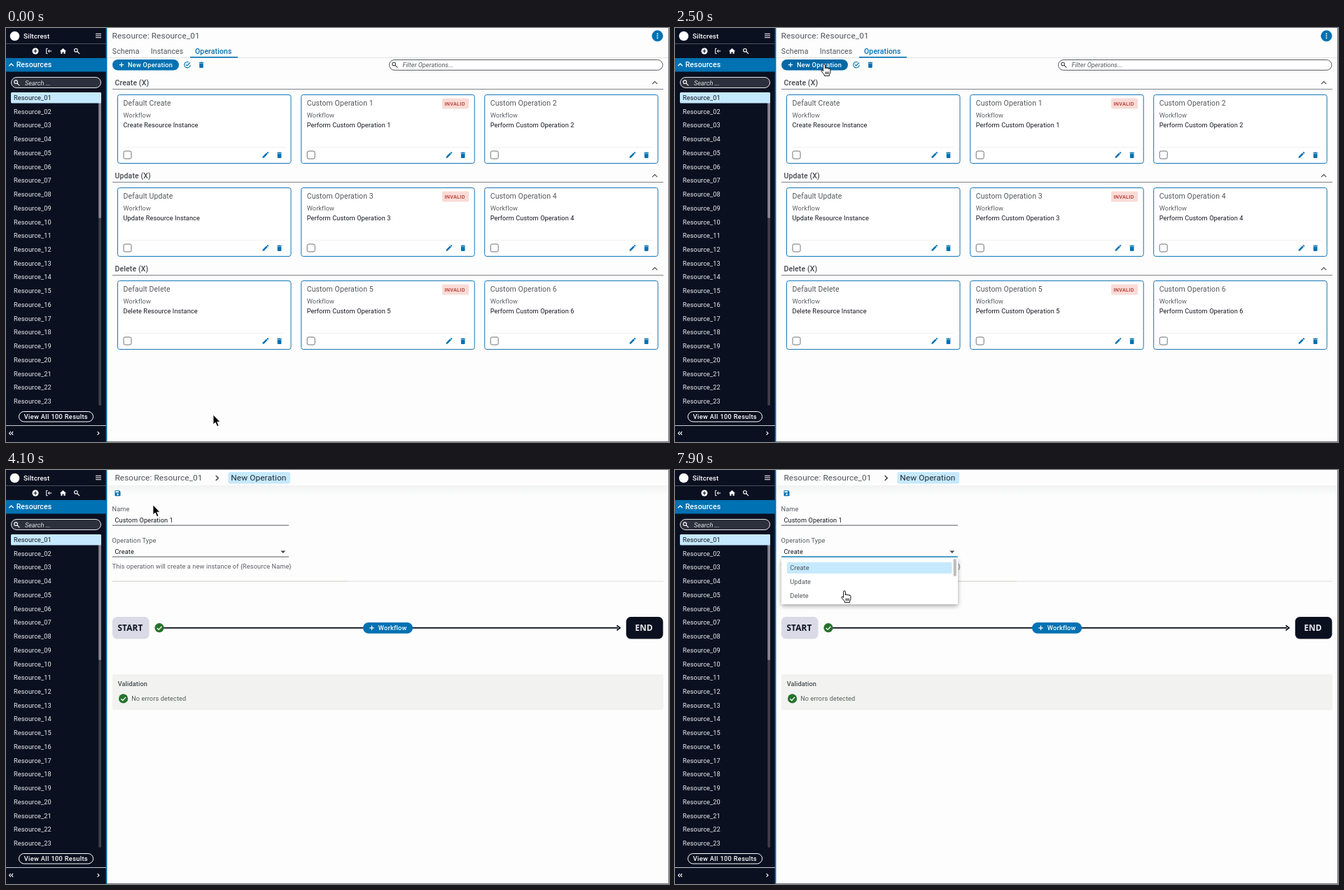
Write an HTML page that moves like this. It is 947 px wide and 592 px high and loops after 8 s.

```html
<!DOCTYPE html>
<html lang="en">
<head>
<meta charset="utf-8">
<title>Resource operations</title>
<style>
html, body { margin: 0; width: 100%; height: 100%; overflow: hidden; background: #fdfdfd; }
svg { display: block; width: 947px; height: 592px; }
text { font-family: Roboto, Arial, sans-serif; letter-spacing: .1px; white-space: pre; }
.sm { font-size: 9.2px; }
.md { font-size: 10.52px; }
.lg { font-size: 11.84px; }
.mid { font-weight: 500; }
.btn { font-size: 9.2px; font-weight: 500; letter-spacing: .26px; }
.it { font-size: 9.2px; font-style: italic; letter-spacing: 0; }
.tag { font-size: 7.23px; font-weight: 500; letter-spacing: .3px; }
.node { font: 700 11.84px "Open Sans", "Noto Sans", sans-serif; letter-spacing: .1px; }
</style>
</head>
<body>
<svg id="stage" viewBox="0 0 947 592" xmlns="http://www.w3.org/2000/svg"></svg>
<script>
const BLUE = '#0071b2', NAVY = '#0b1020', PALE = '#c5e9fe', GREEN = '#26722d';

// Markup helpers
const text = (x, y, str, cls, fill) => `<text x="${x}" y="${y}" class="${cls}" fill="${fill}">${str}</text>`;
const box = (x, y, w, h, fill, r = 0, extra = '') =>
  `<rect x="${x}" y="${y}" width="${w}" height="${h}" rx="${r}" fill="${fill}" ${extra}/>`;
const outline = (x, y, w, h, color, r, fill = 'none') => box(x, y, w, h, fill, r, `stroke="${color}"`);
const disc = (x, y, r, fill) => `<circle cx="${x}" cy="${y}" r="${r}" fill="${fill}"/>`;
const shape = (x, y, d, fill) => `<path transform="translate(${x} ${y})" d="${d}" fill="${fill}" fill-rule="evenodd"/>`;
const stroke = (x, y, d, color, w = 1.2) =>
  `<path transform="translate(${x} ${y})" d="${d}" fill="none" stroke="${color}" stroke-width="${w}"/>`;
const group = (id, body) => `<g id="${id}">${body}</g>`;

// Icons, centred on x, y
const lens = (x, y, color, w = 1.1) => stroke(x, y, 'M.9-1.2A2.3 2.3 0 1 1-3.7-1.2A2.3 2.3 0 1 1 .9-1.2M.4.5L3.8 3.9', color, w);
const plus = (x, y, color, s = 3.2) => stroke(x, y, `M${-s} 0H${s}M0 ${-s}V${s}`, color);
const trash = (x, y) => shape(x, y, 'M-3.2-3.8H-1.4L-.9-4.3H.9L1.4-3.8H3.2V-2.8H-3.2ZM-2.8-2.3H2.8V3.3Q2.8 4.2 1.9 4.2H-1.9Q-2.8 4.2-2.8 3.3Z', BLUE);
const pencil = (x, y) => shape(x, y, 'M-4 4V2.2L1.4-3.2L3.2-1.4L-2.2 4ZM1.9-3.7L2.8-4.5Q3.2-4.8 3.6-4.4L4.4-3.6Q4.8-3.2 4.5-2.8L3.7-1.9Z', BLUE);
const check = (x, y, r) => disc(x, y, r, GREEN) +
  stroke(x, y, `M${-r * .5} ${r * .05}L${-r * .12} ${r * .4}L${r * .52} ${-r * .3}`, '#fff', 1.3);

function sidebar() {
  let s = box(0, 0, 143, 592, NAVY) + box(142.6, 0, 1.8, 592, BLUE);
  s += disc(12.5, 11.5, 6.8, '#fff') + text(25, 14.7, 'Siltcrest', 'mid" font-size="9.86', '#fff');
  s += stroke(132, 11, 'M-4-2.7H4M-4 0H4M-4 2.7H4', '#fff', 1);
  s += box(0, 22, 143, 1, '#4a4f5b');
  s += disc(42, 33, 4.5, '#fff') + plus(42, 33, NAVY, 2.4);
  s += stroke(61, 33, 'M-1.4-3.6H-3.3V3.6H-1.4M4.2 0H-.8M1.2-2L-.8 0L1.2 2', '#fff', 1);
  s += shape(81.5, 33, 'M0-4L4.6.2H3.2V3.8H1V1.2H-1V3.8H-3.2V.2H-4.6Z', '#fff');
  s += lens(101.3, 33, '#fff');
  s += box(0, 43, 143, 19.5, BLUE) + stroke(7.5, 52.5, 'M-3.2 1.7L0-1.5L3.2 1.7', '#fff', 1.3);
  s += text(14.7, 56.2, 'Resources', 'md mid', '#fff');
  s += outline(7.5, 70.5, 128, 15, '#e8e8ea', 7.5, '#2b303c') + lens(15.5, 78.4, '#fff');
  s += text(27, 81.6, 'Search ...', 'it', '#dcdde0');
  s += box(132.3, 92, 3.7, 448, '#3c4049', 1.8) + box(132.3, 92, 3.7, 180, '#858891', 1.8);
  s += box(7, 92, 129, 15.5, PALE, 1.5);
  for (let i = 0; i < 23; i++) {
    const label = 'Resource_' + String(i + 1).padStart(2, '0');
    s += text(11, (103 + i * 19.73).toFixed(2), label, 'sm', i ? '#eceef2' : '#10151f');
  }
  s += outline(18.5, 548.5, 106, 14.5, '#fff', 7.25);
  s += text(25.7, 559, 'View All 100 Results', 'btn" style="letter-spacing:.36px', '#fff');
  s += box(0, 568, 143, 1, '#c9cbd0');
  s += stroke(7.2, 579.5, 'M-.3-2.4L-2.6 0L-.3 2.4M2.9-2.4L.6 0L2.9 2.4', '#fff', 1.1);
  s += stroke(131.8, 579.5, 'M-1.2-2.4L1.2 0L-1.2 2.4', '#fff', 1.1);
  return s;
}

function card(x, y, title, desc, invalid) {
  let s = outline(x, y, 247.5, 98, '#1476b5', 3, '#fff');
  s += text(x + 8, y + 15.8, title, 'md', '#55575c');
  s += text(x + 8, y + 32.8, 'Workflow', 'sm', '#5e6066');
  s += text(x + 8, y + 46, desc, 'sm', '#14161f');
  if (invalid) s += box(x + 201.2, y + 5, 38.3, 15, '#fadbd6', 2) + text(x + 204.8, y + 15.2, 'INVALID', 'tag', '#b3312a');
  s += box(x + 8, y + 74.5, 231.5, 1, '#f0f0f0');
  s += outline(x + 8.5, y + 80.5, 11, 11, '#6f7176', 2.2);
  return s + pencil(x + 211, y + 86.2) + trash(x + 231, y + 86.2);
}

function listPage() {
  let s = text(151.6, 15.2, 'Resource: Resource_01', 'lg', '#50535a');
  s += disc(930.5, 11.3, 8, BLUE) + [-3, 0, 3].map(d => disc(930.5, 11.3 + d, 1, '#fff')).join('');
  s += text(151.8, 36.5, 'Schema', 'md', '#50535a') + text(206.8, 36.5, 'Instances', 'md', '#50535a');
  s += text(270, 36.5, 'Operations', 'md mid', BLUE);
  s += box(145, 42, 801, 1, '#e3e3e3') + box(263, 41, 68, 1.6, BLUE);
  s += box(152, 45, 95, 15.6, BLUE, 7.8, 'id="newBtn"') + plus(165, 52.7, '#fff') + text(174, 56.1, 'New Operation', 'btn', '#fff');
  s += stroke(259, 52.7, 'M4.2 0A4.2 4.2 0 1 1 1.8-3.8M-2-.4L-.4 1.3L4-3.2', BLUE, 1.1) + trash(279, 52.7);
  s += outline(547.5, 45.5, 390.5, 14.8, '#55585e', 7.4, '#fff') + lens(555.5, 52.8, '#44474d');
  s += text(566.5, 56, 'Filter Operations...', 'it', '#55585e');
  ['Create', 'Update', 'Delete'].forEach((kind, row) => {
    const y = row * 133, odd = row * 2 + 1;
    s += text(155.6, 82 + y, kind + ' (X)', 'md mid', '#45484e');
    s += stroke(926.7, 78.3 + y, 'M-3.6 1.8L0-1.8L3.6 1.8', '#45484e', 1.1);
    s += box(152, 87 + y, 787, 1, '#808287');
    s += card(159.5, 95.5 + y, 'Default ' + kind, kind + ' Resource Instance');
    for (const n of [odd, odd + 1])
      s += card(n === odd ? 421.7 : 683.7, 95.5 + y, 'Custom Operation ' + n, 'Perform Custom Operation ' + n, n === odd);
  });
  return s;
}

function formPage() {
  let s = text(155.4, 15.2, 'Resource: Resource_01', 'lg', '#50535a');
  s += stroke(301.5, 11.5, 'M-1.8-3.6L1.8 0L-1.8 3.6', '#35383e', 1.4);
  s += box(317.5, 3, 88.5, 16.5, PALE, 3) + text(321.3, 15.2, 'New Operation', 'lg', '#1d2733');
  s += box(145, 22, 801, 14, 'url(#fade)');
  s += shape(159.5, 33.3, 'M-3.3-4H2.2L4-2.2V3.3Q4 4 3.3 4H-3.3Q-4 4-4 3.3V-3.3Q-4-4-3.3-4ZM-3-3V-1H1.6V-3ZM-1.4 1.5A1.4 1.4 0 1 0 1.4 1.5A1.4 1.4 0 1 0-1.4 1.5Z', BLUE);
  s += text(151.6, 59.3, 'Name', 'sm', '#55585e') + text(155.5, 75.1, 'Custom Operation 1', 'sm', '#14161f');
  s += box(152, 78.6, 252, 1, '#55585e', 0, 'id="nameLine"');
  s += text(151.6, 104.2, 'Operation Type', 'sm', '#55585e') + text(155.5, 119.9, 'Create', 'sm', '#14161f');
  s += shape(395.8, 117.2, 'M-3.5-1.7H3.5L0 1.8Z', '#45484e');
  s += box(152, 123.6, 252, 1, '#55585e', 0, 'id="typeLine"');
  s += text(151.6, 140.9, 'This operation will create a new instance of {Resource Name}', 'sm', '#5e6066');
  s += box(152, 158.6, 336, 1, '#cbccc2') + box(488, 158.6, 451, 1, '#dfdfdd');
  s += box(219, 224.8, 655, 1.9, NAVY) + stroke(877, 225.7, 'M-4.5-3.5L0 0L-4.5 3.5', NAVY, 1.8);
  s += box(152, 210, 52.5, 31.5, '#dadae6', 6.5) + text(159.5, 230.2, 'START', 'node', NAVY);
  s += box(885.8, 210, 52.7, 31.5, NAVY, 6.5) + text(898.6, 230.2, 'END', 'node', '#e9e9f2');
  s += check(219, 225.7, 6.6);
  s += box(510, 218, 71, 15.8, BLUE, 7.9) + plus(522.5, 225.8, '#fff') + text(531.7, 229.1, 'Workflow', 'btn', '#fff');
  s += box(152, 292, 787, 51, '#f2f3f0', 3) + text(159.7, 308.8, 'Validation', 'sm mid', '#45484e');
  s += check(167.6, 326.9, 6.6) + text(179.2, 330.2, 'No errors detected', 'sm', '#5a5d62');
  return s;
}

function menu() {
  let s = box(152, 126, 252, 66, '#fff', 2.5, 'filter="url(#soft)"');
  s += box(160, 132, 235.5, 16, PALE, 1.5) + box(397.6, 127, 4.4, 25, '#bfbfc1', 2.2);
  ['Create', 'Update', 'Delete'].forEach((kind, i) => s += text(164.3, 143.2 + i * 19.73, kind, 'sm', '#50535a'));
  return s;
}

const $ = id => document.getElementById(id);
$('stage').innerHTML = `<defs>
  <linearGradient id="fade" x2="0" y2="1"><stop stop-color="#f1f2f3"/><stop offset="1" stop-color="#fdfdfd"/></linearGradient>
  <filter id="soft" x="-10%" y="-20%" width="120%" height="150%"><feDropShadow dx="0" dy="2.5" stdDeviation="3" flood-opacity=".35"/></filter>
  </defs>` + box(0, 0, 947, 592, '#fdfdfd') + group('list', listPage()) + group('form', formPage()) +
  group('menu', menu()) + sidebar() + box(946, 0, 1, 592, '#73767b') + box(144, 591, 803, 1, '#73767b') +
  group('arrow', '<path d="M0 0V14L3.2 11.1L5.6 16.6L8 15.6L5.6 10.3H9.8Z" fill="#000" stroke="#fff" stroke-width=".8"/>') +
  group('hand', '<path d="M-1.4 9.5V1.2A1.4 1.4 0 0 1 1.4 1.2V6A1.3 1.3 0 0 1 4 6.2A1.3 1.3 0 0 1 6.6 6.8A1.2 1.2 0 0 1 8.9 7.6V11Q8.9 13 7.6 14.5V16.3H.3V15Q-1.6 12.5-4 9.6Q-4.4 8-2.9 8.1Q-2 8.4-1.4 9.5ZM2.2 10.5V14M4.2 10.5V14M6.2 10.5V14" fill="#fff" stroke="#111"/>');

// Pointer stops: time, x, y
const stops = [
  [0, 296, 553], [700, 296, 553], [2000, 213, 52], [3700, 213, 52], [4000, 210, 50],
  [4700, 210, 50], [5700, 264, 80], [6200, 264, 80], [7000, 246, 125.5],
  [7450, 246, 125.5], [7850, 242, 173], [8000, 242, 173]
];
const OPEN_FORM = 3700, OPEN_MENU = 7400;
const ease = p => p < .5 ? 4 * p ** 3 : 1 - 4 * (1 - p) ** 3;

function pointer(t) {
  const i = stops.findIndex(s => s[0] > t);
  const [t0, x0, y0] = stops[i - 1], [t1, x1, y1] = stops[i];
  const p = ease((t - t0) / (t1 - t0));
  return [x0 + (x1 - x0) * p, y0 + (y1 - y0) * p];
}

const show = (id, on) => $(id).setAttribute('visibility', on ? 'visible' : 'hidden');

function line(id, color, y, h) {
  const el = $(id);
  el.setAttribute('fill', color);
  el.setAttribute('y', y);
  el.setAttribute('height', h);
}

function draw(now) {
  const t = Math.floor(now % 8000 / 100) * 100;
  const [x, y] = pointer(t);
  const form = t >= OPEN_FORM, open = t >= OPEN_MENU;
  const onButton = !form && y < 61 && x < 247;
  const onName = form && y > 64 && y < 83;
  const onType = form && y > 108;
  show('list', !form);
  show('form', form);
  show('menu', open);
  show('hand', onButton || onType);
  show('arrow', !(onButton || onType));
  for (const id of ['hand', 'arrow']) $(id).setAttribute('transform', `translate(${x.toFixed(2)} ${y.toFixed(2)})`);
  $('newBtn').setAttribute('fill', onButton && y < 56 ? '#0068a6' : BLUE);
  line('nameLine', onName ? '#2f62a8' : '#55585e', 78.6, 1);
  line('typeLine', onType ? '#0a80c0' : '#55585e', onType ? 123.3 : 123.6, onType ? 1.4 : 1);
  requestAnimationFrame(draw);
}
draw(0);
</script>
</body>
</html>
```
